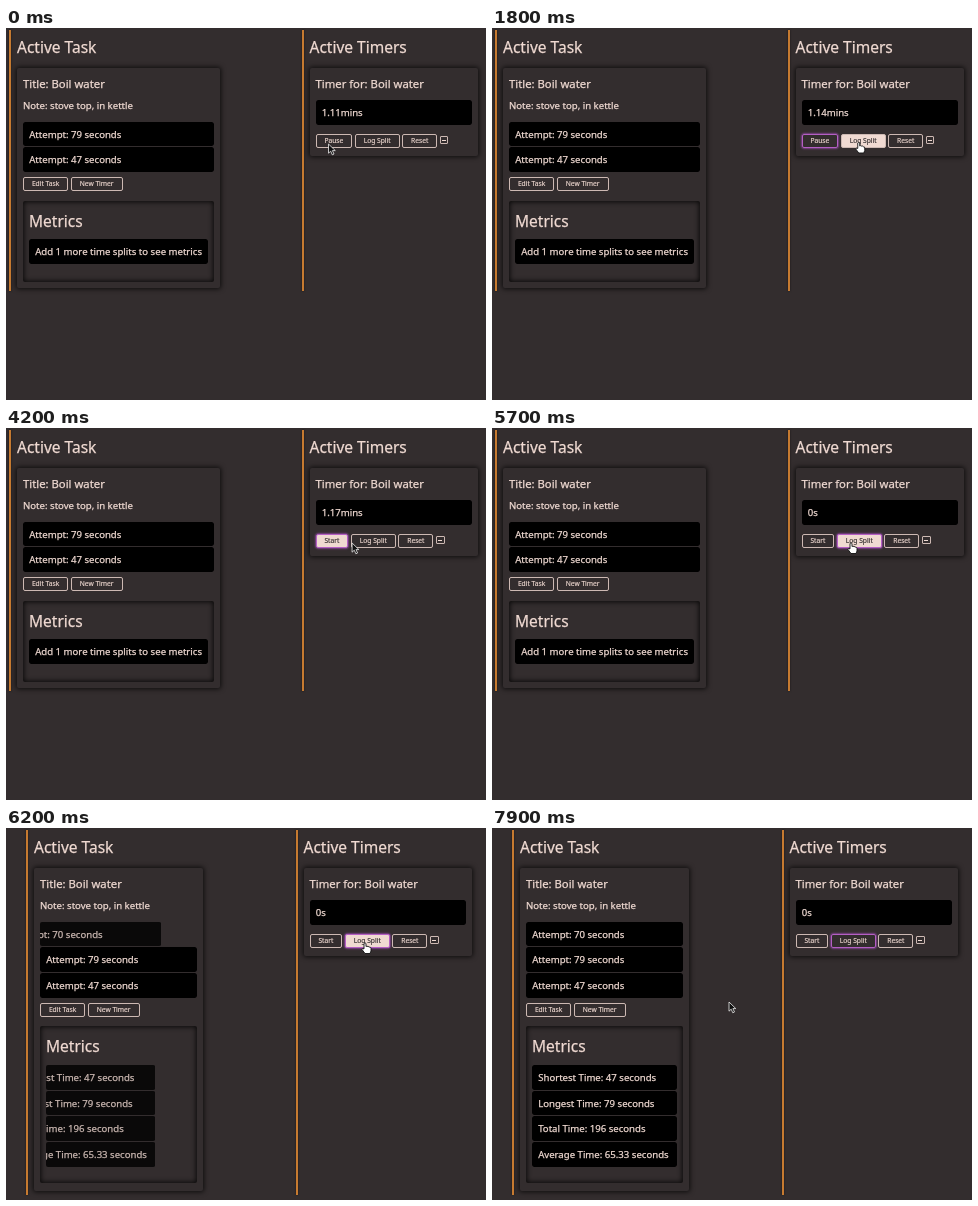
Recreate the animation shown at these times as an HTML page. Size 480x372 px, loop 8 s.

```html
<!DOCTYPE html>
<html lang="en">
<head>
<meta charset="utf-8">
<title>Task timers</title>
<style>
  :root { --bg: #332d2e; --ink: #f0dad2; --line: #cdb9b3; --focus: #b45fc4; }
  * { box-sizing: border-box; }
  html, body { margin: 0; width: 100%; height: 100%; overflow: hidden; background: var(--bg); }
  body { position: relative; color: var(--ink); font: 9.6px/25px "Noto Sans", sans-serif; white-space: nowrap; -webkit-text-stroke: .25px; }
  [hidden] { display: none !important; }

  .column { position: absolute; top: 2px; height: 261px; padding-left: 7px; }
  .column::before { content: ""; position: absolute; left: -1px; top: 0; width: 2px; height: 100%; background: #c67a30; box-shadow: 0 0 2px #0009; filter: blur(.4px); }
  #task { left: 4px; width: 209.5px; }
  #timers { left: 296.5px; width: 175.8px; }
  .logged .column { height: 365px; }
  .logged #task { left: 21px; width: 176px; }
  .logged #timers { left: 290.5px; }

  h1, h2, p { margin: 0; font-weight: 400; }
  h1 { font-size: 15.5px; line-height: 35.5px; height: 38px; }
  h2 { font-size: 11.3px; line-height: 19px; height: 18px; }
  .card { padding: 6px 6px 0; border-radius: 2px; box-shadow: 0 0 5px 1px #000b; }
  #task .card { height: 220px; }
  .logged #task .card { height: 322.5px; }
  #timers .card { height: 88px; }
  .note { line-height: 22.5px; height: 29.8px; padding-top: 3px; }
  .row { height: 24.7px; margin-bottom: 1px; overflow: hidden; border-radius: 2px; }
  .bar { height: 100%; padding-left: 6.2px; background: #000; border-radius: 2px; }
  .buttons { display: flex; gap: 2.6px; margin-top: 5.3px; }
  .button { height: 13.5px; padding: 0 7.9px; border: 1px solid var(--line); border-radius: 2px; font-size: 6.7px; line-height: 12px; -webkit-text-stroke-width: .15px; }
  .button.focus { border-color: var(--focus); box-shadow: 0 0 2px .5px #a14fb5; }
  .metrics { height: 81px; margin-top: 9.7px; padding: 6px 6px 0; border-radius: 2px; box-shadow: inset 0 0 5px 1px #000c; }
  .logged .metrics { height: 157px; }
  .metrics h1 { line-height: 28px; height: 32.7px; }
  #timers .row { margin-top: 8.3px; height: 25px; }
  #timers .buttons { margin-top: 9px; }
  .minus { width: 8.5px; height: 8.5px; margin-top: 1.5px; border: 1px solid var(--line); border-radius: 1px; display: grid; place-items: center; }
  .minus::before { content: ""; width: 4px; height: 1px; background: var(--ink); }
  #cursor { position: absolute; left: 0; top: 0; width: 12px; height: 14px; overflow: visible; }
</style>
</head>
<body>
<section class="column" id="task">
  <h1>Active Task</h1>
  <div class="card">
    <h2>Title: Boil water</h2>
    <p class="note">Note: stove top, in kettle</p>
    <div class="row after"><div class="bar slide">Attempt: 70 seconds</div></div>
    <div class="row"><div class="bar">Attempt: 79 seconds</div></div>
    <div class="row"><div class="bar">Attempt: 47 seconds</div></div>
    <div class="buttons"><span class="button">Edit Task</span><span class="button">New Timer</span></div>
    <div class="metrics">
      <h1>Metrics</h1>
      <div class="row before"><div class="bar">Add 1 more time splits to see metrics</div></div>
      <div class="row after"><div class="bar slide">Shortest Time: 47 seconds</div></div>
      <div class="row after"><div class="bar slide">Longest Time: 79 seconds</div></div>
      <div class="row after"><div class="bar slide">Total Time: 196 seconds</div></div>
      <div class="row after"><div class="bar slide">Average Time: 65.33 seconds</div></div>
    </div>
  </div>
</section>

<section class="column" id="timers">
  <h1>Active Timers</h1>
  <div class="card">
    <h2>Timer for: Boil water</h2>
    <div class="row"><div class="bar" id="clock"></div></div>
    <div class="buttons">
      <span class="button" id="toggle"></span><span class="button" id="split">Log Split</span><span class="button">Reset</span><span class="minus"></span>
    </div>
  </div>
</section>

<svg id="cursor" stroke-linejoin="round">
  <path id="arrow" d="M0 0V9.2L2.2 7.2L3.8 10.8L5.5 10L3.9 6.6H6.8Z" fill="#111" stroke="#eee" stroke-width=".8"/>
  <path id="hand" d="M-1 1Q0-.6 1 1V4Q2 3 3 4.2Q4 3.6 4.8 4.8Q6 4.5 6 6V8.5L5 11H0L-3 7Q-3.2 5.4-1 6.4Z" fill="#fff" stroke="#111" stroke-width=".9"/>
</svg>

<script>
const LOOP = 8000, PAUSED = 3800, FOCUS_SPLIT = 5500, RESET = 5600, LOGGED = 5900, SLIDE_START = 5800;
const ticks = [400, 1000, 1600, 2200, 3000, 3400];

// Pointer path: time, x, y
const path = [
  [0, 322.5, 116], [90, 322.5, 116], [100, 324, 115.5], [600, 324, 115.5], [900, 333, 135], [1050, 345, 144],
  [1200, 356, 140], [1400, 365, 122], [1600, 366.5, 114.5], [2000, 367, 113.5], [3200, 367, 113.5],
  [3600, 325, 113.5], [4100, 326, 113.5], [4200, 346, 115], [4300, 354, 114.5], [4500, 359, 114.5], [6250, 359, 114.5],
  [6500, 330, 143], [6700, 281, 167], [6800, 250, 168], [6900, 239, 167], [7100, 239, 167], [7900, 237, 174]
];

const $ = id => document.getElementById(id);
const all = selector => [...document.querySelectorAll(selector)];
const ramp = (t, from, to) => Math.min(1, Math.max(0, (t - from) / (to - from)));

const before = all('.before'), after = all('.after');
const slides = all('.slide').map(bar => {
  const slide = bar.animate(
    { transform: ['translateX(-182px)', 'none'], opacity: [0, 1] },
    { duration: 800, easing: 'ease', fill: 'both' });
  slide.pause();
  return slide;
});

function pointerAt(t) {
  const next = path.findIndex(key => key[0] > t);
  if (next < 0) return path.at(-1).slice(1);
  const [a, b] = [path[next - 1], path[next]];
  const k = ramp(t, a[0], b[0]);
  return [1, 2].map(i => a[i] + (b[i] - a[i]) * k);
}

function paintButton(button, hover, focused) {
  const mix = (from, to) => Math.round(from + (to - from) * hover);
  button.style.background = `rgba(240, 218, 210, ${hover})`;
  button.style.color = `rgb(${mix(240, 51)}, ${mix(218, 45)}, ${mix(210, 46)})`;
  button.classList.toggle('focus', focused);
}

function render(t) {
  const logged = t >= LOGGED;
  document.body.classList.toggle('logged', logged);
  before.forEach(row => row.hidden = logged);
  after.forEach(row => row.hidden = !logged);
  slides.forEach(slide => slide.currentTime = Math.max(0, t - SLIDE_START));

  const minutes = 1.11 + ticks.filter(tick => t >= tick).length / 100;
  $('clock').textContent = t < RESET ? minutes.toFixed(2) + 'mins' : '0s';
  $('toggle').textContent = t < PAUSED ? 'Pause' : 'Start';
  paintButton($('toggle'), ramp(t, 3400, 3600) - ramp(t, 4200, 4400), t >= 700 && t < FOCUS_SPLIT);
  paintButton($('split'),
    ramp(t, 1450, 1700) - ramp(t, 3300, 3500) + ramp(t, 4250, 4450) - ramp(t, 6350, 6550),
    t >= FOCUS_SPLIT);

  const [x, y] = pointerAt(t);
  const pointing = t >= 1450 && t < 4150 || t >= 4250 && t < 6350;
  $('cursor').style.transform = `translate(${x}px, ${y}px)`;
  $('hand').style.display = pointing ? '' : 'none';
  $('arrow').style.display = pointing ? 'none' : '';
}

const start = performance.now();
function frame() {
  render((performance.now() - start) % LOOP);
  requestAnimationFrame(frame);
}
frame();
</script>
</body>
</html>
```
